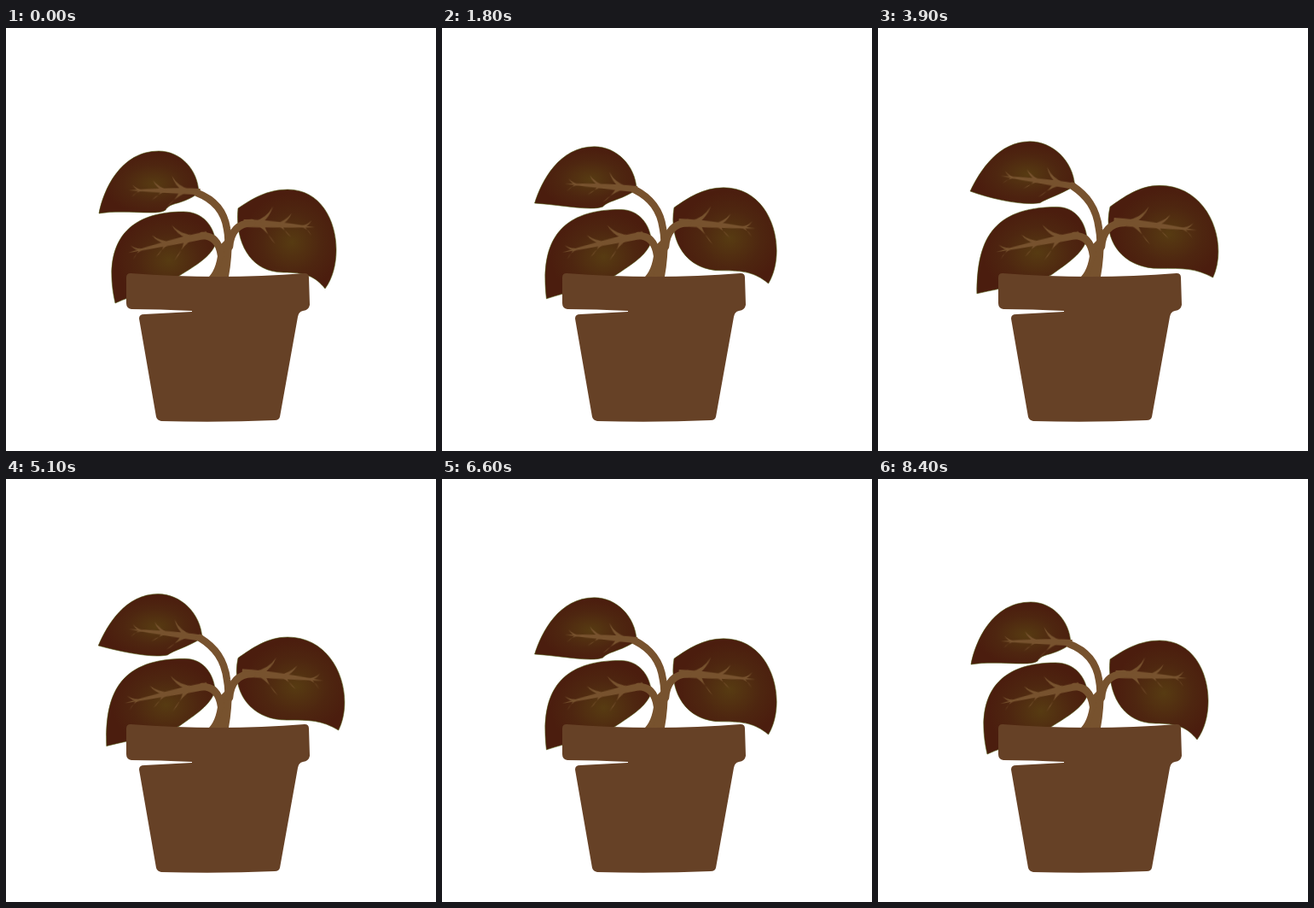
An HTML page without scripts for the animation above (8.7 s loop, 504 by 495 pixels).

```html
<!DOCTYPE html>
<html lang="en">
<head>
<meta charset="utf-8">
<title>Potted plant</title>
<style>
html, body { margin: 0; width: 100%; height: 100%; overflow: hidden; background: #fff; }
svg { display: block; width: 100%; height: 100%; }

/* 29 ticks of 300 ms: 14 rising, then 15 from the top back to rest. */
.bend, .swing { animation: bend 8700ms steps(14) infinite; }
.swing { transform: var(--rest); animation-name: swing; }
@keyframes bend {
  48.2759% { d: var(--up); animation-timing-function: steps(15, jump-none); }
}
@keyframes swing {
  48.2759% { transform: var(--up); animation-timing-function: steps(15, jump-none); }
}

.leaf { fill: url(#leaf); stroke: #4f5a14; stroke-width: .6; }
.wood { fill: #77522e; }
.stem { fill: none; stroke: #77522e; stroke-width: 8.5; stroke-linecap: round; }
.pot { fill: #664126; }
</style>
</head>
<body>
<svg viewBox="0 0 504 495">
  <defs>
    <radialGradient id="leaf" cx=".55" cy=".53" r=".5">
      <stop offset="0" stop-color="#573b12"/>
      <stop offset=".6" stop-color="#4e2610"/>
      <stop offset="1" stop-color="#4b1d0e"/>
    </radialGradient>
    <!-- midrib of length 100 with side veins, shared by all leaves -->
    <g id="veins" class="wood">
      <path d="M-2,-5Q40,-6 100,0Q40,3 -2,4Z"/>
      <path d="M12,-3Q30,-7 39,-22Q34,-8 24,-2ZM44,-2Q57,-5 66,-15Q61,-5 52,-1ZM78,-1Q88,-1 95,-8Q90,0 84,0Z"/>
      <path d="M20,2Q34,9 45,22Q35,15 28,1ZM48,1Q58,4 67,13Q58,8 54,0ZM80,0Q91,2 96,10Q91,5 86,0Z"/>
    </g>
  </defs>

  <!-- upper left leaf -->
  <path class="leaf bend"
    d="M109,217C114,190 134,144 179,144C204,144 225,165 226,193C205,208 193,203 187,213C178,220 140,212 109,217Z"
    style="--up:path('M108,189C120,165 142,132 178,132C205,132 229,155 231,184C212,195 199,199 190,204C170,207 135,200 108,189Z')"/>
  <use href="#veins" class="swing"
    style="--rest:translate(226px,192px) rotate(1.4deg) scale(-.82,.82);
           --up:translate(229px,185px) rotate(8.7deg) scale(-.86,.82)"/>

  <!-- lower left leaf -->
  <path class="leaf bend"
    d="M128,322C115,265 130,215 208,215C231,215 244,232 246,252C240,268 222,278 203,290C180,305 150,312 128,322Z"
    style="--up:path('M115,310C116,250 132,209 210,209C231,209 243,226 245,246C240,264 222,275 203,289C180,300 150,302 115,310Z')"/>
  <use href="#veins" class="swing"
    style="--rest:translate(234px,243px) rotate(-12.4deg) scale(-.93,.93);
           --up:translate(234px,243px) rotate(-11.2deg) scale(-.98,.93)"/>

  <!-- right leaf -->
  <path class="leaf bend"
    d="M374,305C400,270 388,189 330,189C306,189 288,200 272,211C268,250 286,286 325,286C350,286 362,290 374,305Z"
    style="--up:path('M394,291C412,250 388,184 330,184C306,184 288,198 272,209C262,250 288,281 330,281C358,281 372,280 394,291Z')"/>
  <use href="#veins" class="swing"
    style="--rest:translate(280px,229px) rotate(3deg) scale(.82,1);
           --up:translate(278px,227px) rotate(6deg) scale(.97,1)"/>

  <!-- stems -->
  <path class="wood" d="M238,291Q248,280 249,256L265,240Q265,270 261,291Z"/>
  <path class="stem bend"
    d="M252,291C260,270 262,250 259,235C256,215 245,201 224,193"
    style="--up:path('M252,291C260,270 262,250 259,235C256,210 245,196 228,184')"/>
  <path class="stem" d="M252,266Q249,243 230,243M262,256Q264,229 288,228"/>

  <path class="pot" d="M146,287Q250,295 350,287Q355,287 355,292L356,324Q355,330 348,331Q343,332 342,338L321,455Q320,459 315,459Q250,462 182,460Q177,459 176,455L156,340Q156,335 162,335L218,332V331Q180,329 147,329Q141,328 141,322V292Q141,287 146,287Z"/>
</svg>
</body>
</html>
```
